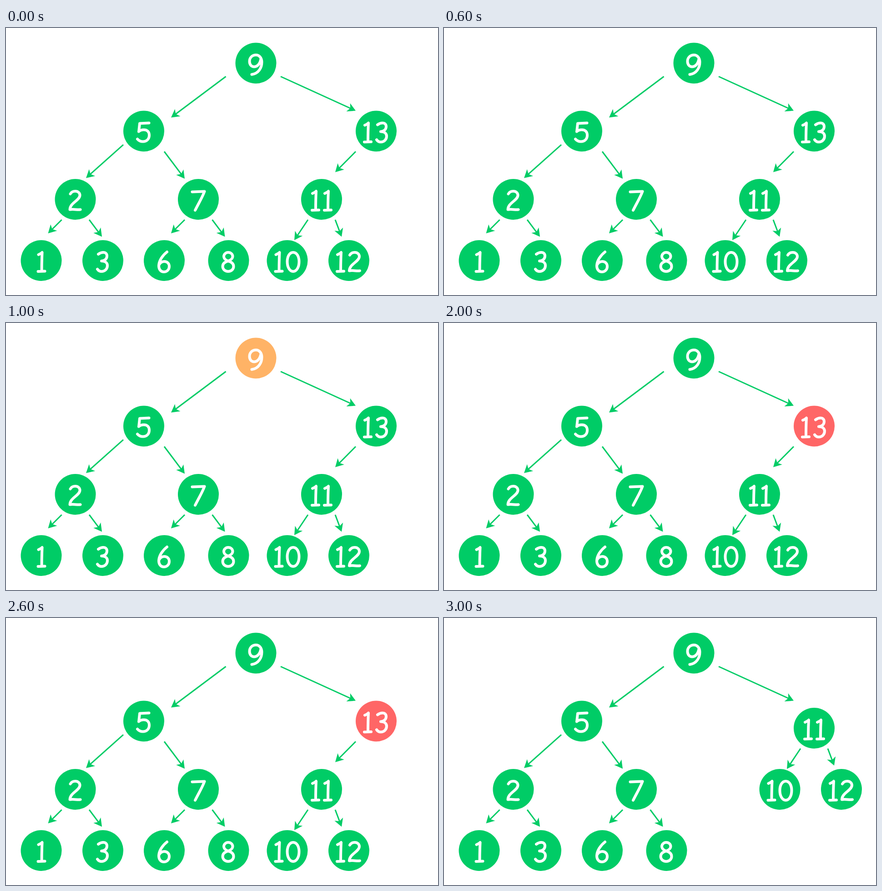
An HTML page for the animation above (4000 ms loop, 950x589 px).

```html
<!DOCTYPE html>
<html lang="en">
<head>
<meta charset="utf-8">
<title>Deleting a node with one child</title>
<style>
  html, body { margin: 0; width: 100%; height: 100%; overflow: hidden; background: #fff; }
  svg { display: block; width: 100%; height: 100%; }
  circle { fill: #00cc66; }
  .edge { stroke: #00cc66; stroke-width: 3; }
  .head { fill: #00cc66; }
  .digit { fill: none; stroke: #fff; stroke-width: 6; stroke-linecap: round; stroke-linejoin: round; }
  text { font: 54px "Open Sans", sans-serif; text-anchor: middle; fill: transparent; }
</style>
</head>
<body>
<svg viewBox="0 0 950 589">
  <g id="tree"></g>
  <g id="removed"></g>
  <g id="subtree"></g>
</svg>
<script>
// Hand-lettered digits, drawn around the centre of a node
const digits = [
  'M0 -18C8 -18 13 -9 13 2.5S8 24 0 24S-13 14 -13 2.5S-8 -18 0 -18Z',
  'M-6 -13Q-1 -15 2 -18Q1 0 1 23.5M-7 24L8 23.5',
  'M-11 -12C-9 -16 -5 -18 0 -18C6 -18 10 -14 10 -9C10 2 -12 8 -12 22.5C-4 21 4 23.5 11 22.5',
  'M-10 -14C-6 -17 -3 -18 1 -18C6 -18 9 -15 9 -10C9 -4 4 1 -3 1C5 1 10 5 10 11C10 18 5 24 -3 24C-7 24 -10 22 -12 19',
  '',
  'M11.5 -18L-9 -17L-11 1C-8 -2 -4 -3 0 -3C8 -3 12 2 12 9C12 17 7 23 -2 23C-7 23 -11 21 -14 17.5',
  'M6 -19C-3 -12 -12 0 -12 12C-12 20 -7 25 -1 25C6 25 11 20 11 13C11 6 6 2 0 2C-6 2 -10 6 -12 11',
  'M-13.5 -16.5L13.5 -17.5C8 -3 2 6 -7 24',
  'M-1 1C-7 -1 -10.5 -5 -10.5 -9C-10.5 -14 -6 -18 -1 -18C5 -18 9 -14 9 -9C9 -5 5 -1 -1 1C-8 3 -13 7 -13 13C-13 19 -8 24 -1 24C6 24 11 19 11 13C11 7 6 3 -1 1Z',
  'M11 -9C9 2 3 8 -4 8C-10 8 -14 3 -14 -4C-14 -12 -8 -18 0 -18C8 -18 13 -11 13 -2C13 10 6 23 -9 25'
];

function node(value, x, y) {
  const label = String(value);
  const shifts = label.length === 1 ? [0] : [value === 11 ? -14 : -19, 13];
  const strokes = shifts.map((dx, i) =>
    `<path class="digit" d="${digits[label[i]]}" transform="translate(${dx})"/>`).join('');
  return `<g id="n${value}" transform="translate(${x} ${y})"><circle r="45"/>${strokes}
    <text y="22">${label}</text></g>`;
}

function arrow(x1, y1, x2, y2) {
  const length = Math.hypot(x2 - x1, y2 - y1);
  const angle = Math.atan2(y2 - y1, x2 - x1) * 180 / Math.PI;
  return `<g transform="translate(${x2} ${y2}) rotate(${angle})">
    <path class="edge" d="M${-length} 0H-12"/>
    <path class="head" d="M0 0L-18 -10L-13 0L-18 10Z"/></g>`;
}

const get = id => document.getElementById(id);

get('tree').innerHTML =
  arrow(483.5, 107, 363, 197.5) + arrow(604, 107, 769, 182.5) +
  arrow(258, 257.5, 176, 331) + arrow(348, 272.5, 393, 332.5) +
  arrow(122.5, 423, 92.5, 453) + arrow(183, 423, 211, 460.5) +
  arrow(393, 423, 363, 453) + arrow(453.5, 423, 481.5, 460.5) +
  node(9, 549.5, 77.5) + node(5, 303, 227.5) +
  node(2, 152.5, 378) + node(7, 423, 378) +
  node(1, 77.5, 513) + node(3, 213, 513) +
  node(6, 348, 513) + node(8, 489.5, 513);

get('removed').innerHTML = arrow(769, 272.5, 724, 318) + node(13, 814, 227.5);

get('subtree').innerHTML =
  arrow(664, 423, 634, 468) + arrow(724, 423, 738, 460.5) +
  node(11, 694, 378) + node(10, 618.5, 513) + node(12, 754, 513);

const disc = value => get('n' + value).firstChild;

function draw(now) {
  const step = Math.floor(now / 1000) % 4;
  disc(9).style.fill = step === 1 ? '#ffb366' : '';
  disc(13).style.fill = step === 2 ? '#ff6666' : '';
  get('removed').style.display = step === 3 ? 'none' : '';
  get('subtree').setAttribute('transform', step === 3 ? 'translate(120 -135)' : '');
  requestAnimationFrame(() => draw(performance.now() - start));
}

const start = performance.now();
draw(0);
</script>
</body>
</html>
```
